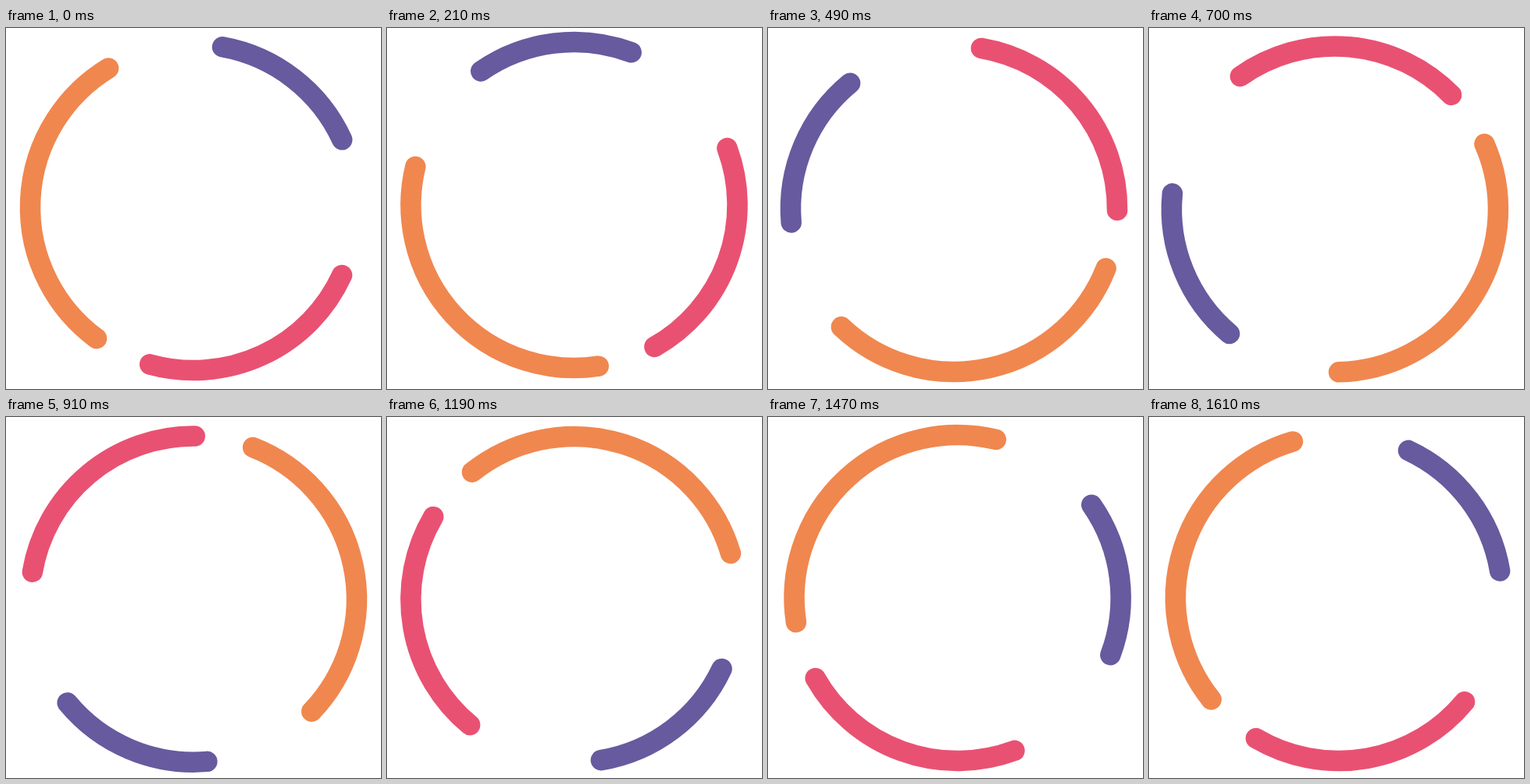
Animation of 480 by 463 pixels, one loop 1.68 s. Source, as an HTML page:

```html
<!DOCTYPE html>
<html lang="en">
<head>
<meta charset="utf-8">
<title>Rotating arcs</title>
<style>
  html, body { margin: 0; width: 100%; height: 100%; overflow: hidden; background: #fff; }
  svg { display: block; }
</style>
</head>
<body>
<svg width="480" height="463" viewBox="0 0 480 463">
  <g id="ring" fill="none" stroke-width="26.5" stroke-linecap="round"></g>
</svg>
<script>
const STEP_MS = 70, STEPS = 24, RADIUS = 209;
const ring = document.getElementById('ring');

// Start and end angles in degrees, counter-clockwise from the right.
const arcs = [
  { color: '#675a9e', from: 24.5, to: 79.8 },
  { color: '#f0874f', from: 121.4, to: 233.6 },
  { color: '#e95172', from: 254.5, to: 335.4 }
];

// The ring's centre drifts slightly: [step, x, y].
const drift = [
  [0, 240, 230], [3, 239.5, 227], [7, 238, 232], [9, 237.3, 232],
  [13, 239.9, 233.6], [17, 239.4, 234], [19, 242.2, 232], [23, 243, 232]
];

function point(deg) {
  const a = deg * Math.PI / 180;
  return `${RADIUS * Math.cos(a)} ${-RADIUS * Math.sin(a)}`;
}

for (const { color, from, to } of arcs) {
  const path = document.createElementNS('http://www.w3.org/2000/svg', 'path');
  path.setAttribute('stroke', color);
  path.setAttribute('d', `M${point(from)} A${RADIUS} ${RADIUS} 0 0 0 ${point(to)}`);
  ring.append(path);
}

function centreAt(step) {
  const i = Math.max(1, drift.findIndex(key => key[0] >= step));
  const [s0, x0, y0] = drift[i - 1], [s1, x1, y1] = drift[i];
  const t = (step - s0) / (s1 - s0);
  return [x0 + (x1 - x0) * t, y0 + (y1 - y0) * t];
}

function draw() {
  const step = Math.floor(performance.now() / STEP_MS) % STEPS;
  const [x, y] = centreAt(step);
  ring.setAttribute('transform', `translate(${x} ${y}) rotate(${-step * 360 / STEPS})`);
  requestAnimationFrame(draw);
}
draw();
</script>
</body>
</html>
```
